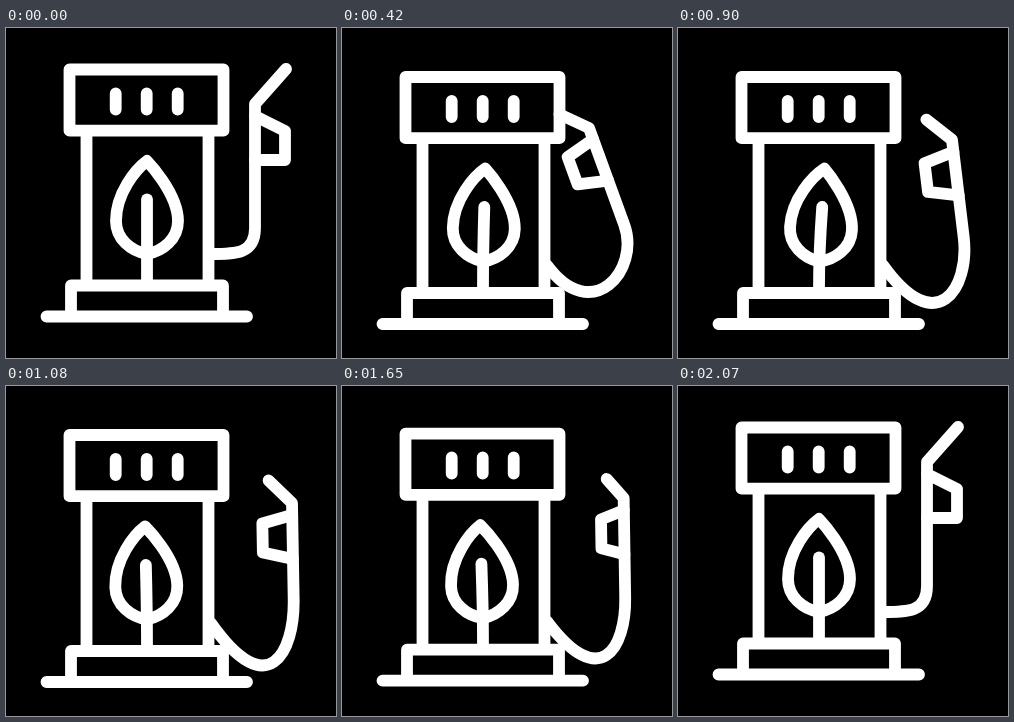
These frames come from a looping animation (330x330 px, 2.25 s). An HTML page:

```html
<!DOCTYPE html>
<html lang="en">
<head>
<meta charset="utf-8">
<title>Green fuel pump</title>
<style>
  html, body { margin: 0; width: 100%; height: 100%; overflow: hidden; background: #000; }
  svg { display: block; width: 100%; height: 100%; }
  svg * { fill: none; stroke: #fff; stroke-width: 11.8; stroke-linecap: round; stroke-linejoin: round; }
</style>
</head>
<body>
<svg viewBox="0 0 330 330">
  <path id="hose"/>
  <path id="handle"/>
  <g id="pump">
    <path d="M63.5 41.5H217.5V102.7H63.5ZM80.5 103V253M202.5 103V253M65 288V257.5H217V288M40.5 288.5H241"/>
    <path d="M109.7 65.3V81.5M140.7 65.3V81.5M171.7 65.3V81.5"/>
    <path id="leaf" d="M141 133C130 141 110 165 110 193C110 211 125 223 141 226C157 223 172 211 172 193C172 165 141 133 141 133Z"/>
    <path id="stem"/>
  </g>
</svg>
<script>
const LOOP = 2250, STEP = 30;
const $ = id => document.getElementById(id);

// Smooth 0 to 1 between two times
const ease = (t, from, to) => {
  const u = Math.min(1, Math.max(0, (t - from) / (to - from)));
  return (1 - Math.cos(Math.PI * u)) / 2;
};
const rad = deg => deg * Math.PI / 180;

function drawNozzle(t, drop) {
  const out = ease(t, 90, 420), back = ease(t, 1530, 2070);
  const turn = out - back;                   // flipped over and docked
  const pull = ease(t, 600, 1080) - back;    // drawn away from the pump
  const swing = Math.sin(Math.PI * out);
  const side = 1 - 2 * turn;                 // 1 faces right, -1 faces left

  const jx = 249 - 2 * turn + 39 * pull - 5 * swing;
  const jy = 76 + 24 * turn + 17 * pull - 3 * swing;
  const tilt = rad(20 * turn - 19 * pull + 4 * swing);
  const sin = Math.sin(tilt), cos = Math.cos(tilt);
  // Point measured from the joint, across and along the tilted hose
  const at = (across, along) =>
    [jx + across * cos + along * sin, jy - across * sin + along * cos];

  const length = 124 - 21 * turn - 7 * pull;
  const slack = 26 + 22 * turn + 6 * pull;
  const tip = at(27 * side + 4, -17 - 6 * side - 12 * side * side);
  const wall = [205, 226 + 1.5 * drop];
  const sag = [wall[0] + 25 + 20 * turn + 12 * pull, wall[1] + 61 * turn + 20 * pull];
  const slide = 3.5 * side;

  $('hose').setAttribute('d',
    `M${tip}L${at(0, 0)}L${at(0, length)}C${at(0, length + slack)} ${sag} ${wall}`);
  $('handle').setAttribute('d',
    `M${at(0, 12)}L${at(30 * side, 23.5 + slide)}L${at(30 * side, 52.5 + slide)}L${at(0, 56)}`);
}

function drawLeaf(t) {
  const lean = 5.2 * (ease(t, 270, 720) - 2 * ease(t, 720, 1350) + ease(t, 1350, 1830));
  const top = [141 + 57 * Math.sin(rad(lean)), 171.5];
  $('leaf').setAttribute('transform', `rotate(${lean} 141 228)`);
  $('stem').setAttribute('d', `M141 253Q141 215 ${top}`);
}

function draw(t) {
  const drop = 7.5 * (ease(t, 90, 420) - ease(t, 1500, 2040));
  $('pump').setAttribute('transform', `translate(0 ${drop})`);
  drawNozzle(t, drop);
  drawLeaf(t);
}

const start = performance.now();
function tick() {
  const t = (performance.now() - start) % LOOP;
  draw(Math.floor(t / STEP) * STEP);
  requestAnimationFrame(tick);
}
tick();
</script>
</body>
</html>
```
